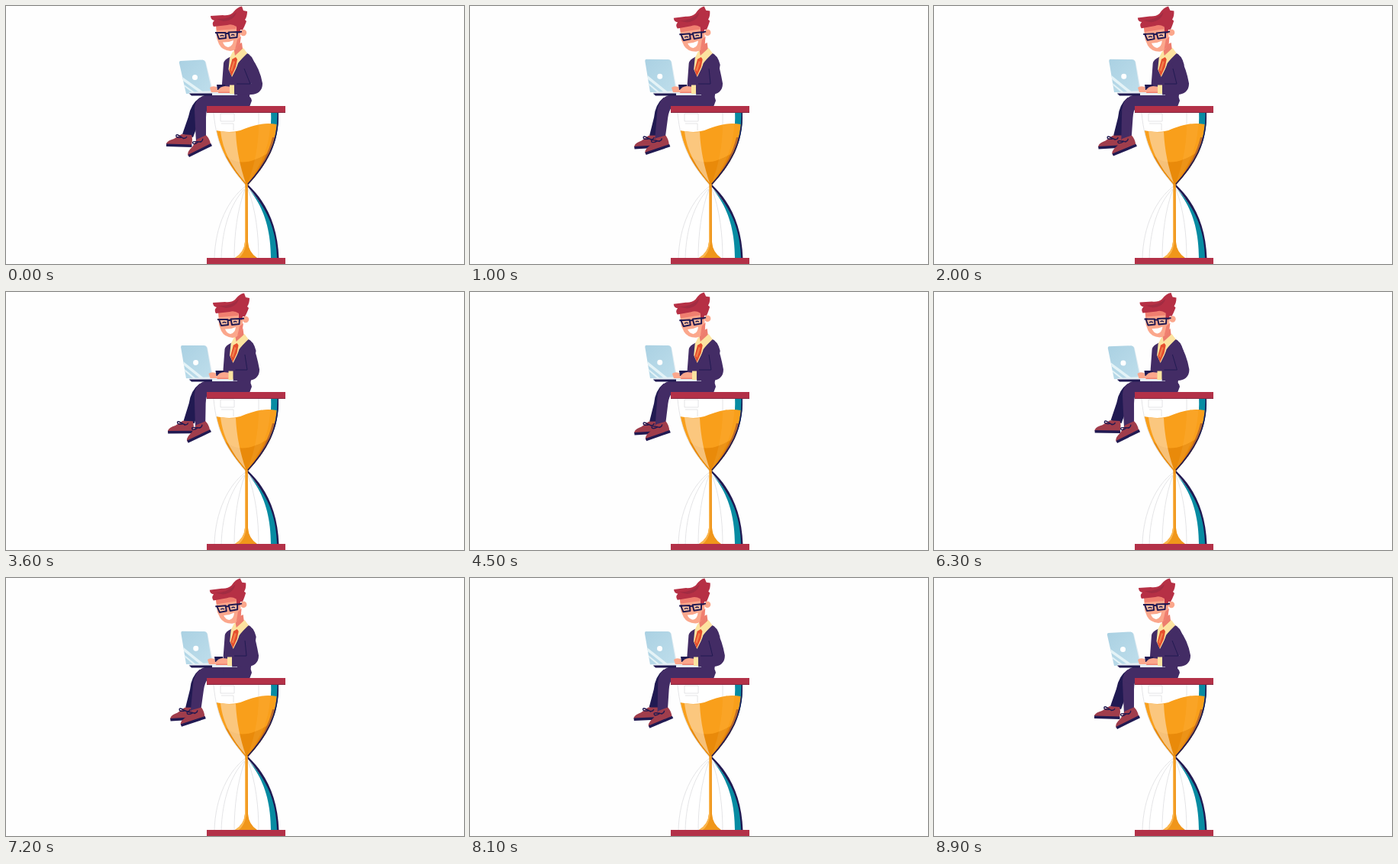
Recreate the animation shown at these times as an HTML page. Size 600x338 px, loop 9000 ms.

```html
<!DOCTYPE html>
<html lang="en">
<head>
<meta charset="utf-8">
<title>Working on the hourglass</title>
<style>
html, body { margin: 0; width: 100%; height: 100%; overflow: hidden; background: #fefefe; }
svg { display: block; width: 100vw; height: 100vh; }
.ink { fill: #211a52; }
.suit { fill: #432c65; }
.bar { fill: #b33148; }
.shoe { fill: #a03d4c; }
.hair { fill: #b63045; }
.skin { fill: #fba78c; }
.cream { fill: #fce3a0; }
.teal { fill: #078ba2; }
.line { fill: none; stroke: #dedde0; stroke-width: .8; }
.lace { fill: none; stroke: #211a52; stroke-width: 1.4; }
</style>
</head>
<body>
<svg viewBox="0 0 600 338">
  <defs>
    <clipPath id="bulb"><path d="M272 140H357C358 180 342 207 315.500 236C290 207 276 184 272 140Z"/></clipPath>
    <clipPath id="lidClip"><path d="M228.500 72L257 70.500Q260 70.500 261 73L270 113L236 115L227 75Q226.500 72 228.500 72Z"/></clipPath>
    <linearGradient id="screen" x2="1" y2="1">
      <stop offset="0" stop-color="#a9d0e2"/><stop offset="1" stop-color="#c0dfec"/>
    </linearGradient>
    <g id="foot">
      <path class="shoe" d="M0 13Q2 9 10 7L20 1L33 2Q35 8 33 15L0 15Z"/>
      <path class="ink" d="M0 13.500L33.500 14.500V18L0 17Z"/>
      <path class="lace" d="M20 5Q12 -1 13 4Q15 6 20 5Q25 8 27 4M19 4L23 7"/>
    </g>
  </defs>

  <!-- hourglass -->
  <g clip-path="url(#bulb)">
    <path fill="#fff" d="M270 138h90v100h-90z"/>
    <path class="teal" d="M347 138H360V238H315Q350 195 347 138Z"/>
    <path fill="#f99f1b" d="M275 163C286 165 296 166 307 163C325 156 338 152 354.500 155C353 184 338 210 315.500 236C293 211 279 187 275 163Z"/>
    <path fill="#e98a0a" d="M281 190C297 207 315 212 349 189L340 215L315.500 238L290 211Z"/>
    <path fill="#fdd9a8" opacity=".7" d="M281 164Q291 166 301 165C302 189 307 211 314 232C296 211 284 190 281 164Z"/>
    <path fill="#fdc169" opacity=".15" d="M331 155.500Q338 153 346 154C346 182 335 207 317 232C326 207 331 182 331 155.500Z"/>
    <path fill="#a75a30" opacity=".75" d="M349 172C345 190 335 210 316 235C340 211 350 192 353.500 172Z"/>
    <path fill="none" stroke="#211a52" stroke-width="3" d="M357 140C358 180 342 207 315.500 236"/>
  </g>
  <path class="line" d="M272 140C276 184 290 207 314 235M281 141h18v10h-18zM282 154h16v9M331 140V155"/>
  <path fill="#fff" d="M315 235C291 252 275 287 273 331H356C354 288 338 257 315 235Z"/>
  <path class="ink" d="M314 234H317C341 257 356 287 357.500 331H354C353 289 337 258 314 234Z"/>
  <path class="teal" d="M318 239.500C340 263 354 289 355 331H347C347 289 336 262 318 239.500Z"/>
  <path class="line" d="M314 236C291 253 274 288 273 331M312 240C294 259 283 292 282 331M313 240C303 267 299 299 299 331M317 240C327 266 331 299 331 331"/>
  <path fill="#f0961a" d="M313.300 233H316.800L317 309Q318 323 329 330H300Q312 323 313 309Z"/>
  <path fill="#fbb64e" d="M313.300 238H314.500V312Q312 325 305 330H300Q312 323 313 309Z"/>
  <path class="bar" d="M263 330h103v8H263z"/>

  <!-- legs -->
  <g id="farLeg">
    <path class="ink" d="M254 120Q242 128 239 145L231 168L245 172L254 148L262 130Z"/>
    <use href="#foot" transform="translate(210 167)"/>
  </g>
  <g id="nearLeg">
    <path class="suit" d="M247 136Q249 121 264 121L266 131Q262 136 262 146V172L249 178Q248 160 247 136Z"/>
    <use href="#foot" transform="translate(232 183) rotate(-28)"/>
  </g>
  <path class="suit" d="M247 135Q247 120 263 116H312Q321 117 322 124L319 132H263L259 140Z"/>
  <path class="bar" d="M263 131h103v9H263z"/>
  <path fill="#842a42" d="M263 139h103v1H263z"/>

  <!-- torso -->
  <g id="torso">
    <path class="suit" d="M285 75Q286 70 293 67L314 61Q323 64 326 77L319 118V125H284L283 102Z"/>
    <path class="cream" d="M293 68L297 60L307 52L316 62L305 75L296 93L291.500 83Z"/>
    <path class="suit" d="M314 62L319 64L314 100H296L304 75Z"/>
    <path fill="#e64e2d" d="M296 66L301 66L303 70L301 80L295.500 92L292.500 84L296 71Z"/>
    <path fill="#f0824b" d="M298 72l2 1-4 13-2-2z"/>
    <path fill="#ed7e6e" d="M298 53L309 48L310 56L300 65Z"/>
    <path class="cream" d="M296 63L301 66L311 55L316 62L306 72L301 67L294 71Z"/>
  </g>

  <!-- head -->
  <g id="head">
    <path class="skin" d="M275 24L307 20V48Q302 59 294 59Q283 58 279 50L276 42Z"/>
    <circle class="skin" cx="311" cy="35" r="4.200"/>
    <path fill="#f07f70" d="M275 24L304 22L301 30L276 32ZM303 44L308 40L306 52L300 57Z"/>
    <path class="hair" d="M268 13L284 12Q292 13 297 9Q303 1 309 .5L311 6L316 7Q316 14 313 18L315 20Q312 28 310 31H307L306 36L302 33V27Q296 23 290 25L272 27Q269 22 273 19Q268 18 268 13Z"/>
    <path fill="#a22c42" d="M275 17Q292 18 302 8Q299 19 285 20Z"/>
    <g fill="#fcc0a2" stroke="#211a52" stroke-width="2" stroke-linejoin="round">
      <path d="M276 35L287.500 35L288 42L279 43Z"/>
      <path d="M291.500 34.500L303 34L302.500 41L293 42Z"/>
      <path fill="none" d="M274 35H278M287 36H292M303 34.500L309 33.500"/>
    </g>
    <path class="lace" d="M280.500 39.500Q283 37.500 285.500 39.500M295 38.500Q297 36.500 299.500 38.500"/>
    <path fill="#fff" d="M284 47.500Q291 48 298 45Q297 53 291 54Q286 53 284 47.500Z"/>
  </g>

  <!-- laptop -->
  <g id="lid">
    <path fill="#e2ecf2" d="M257 70.500Q261 71 262 74L271.500 113H267Z"/>
    <g clip-path="url(#lidClip)">
      <path fill="url(#screen)" d="M225 68h47v50h-47z"/>
      <path fill="#e4f3f7" d="M231 93L266 118H260L232 98ZM232 102L254 118H250L233 105Z"/>
    </g>
    <circle cx="247.500" cy="93.500" r="3.500" fill="#fff"/>
  </g>
  <path fill="#e4edf3" d="M240 113L270 111L303 114.500V117H240Z"/>
  <path class="ink" d="M240 114.500H270V117.500H243Z"/>

  <!-- arms -->
  <g id="hands">
    <path class="skin" d="M267 107Q270 104 276 106L278 113H269Z"/>
    <path class="ink" d="M276 103H287L288 110H277Z"/>
    <path class="skin" d="M277 111Q281 105 287 105L296 106V114H278Z"/>
    <path fill="#ef806d" d="M279 112.500h14v1.500h-15z"/>
  </g>
  <path id="arm" fill="none" stroke="#432c65" stroke-width="14" stroke-linejoin="round"/>
  <path id="fold" fill="none" stroke="#211a52" stroke-width="1"/>
  <path id="cuff" class="cream" d="M293 103.500H299V115H293Z"/>
</svg>
<script>
const CYCLE = 3, times = [0, .6, 1, 1.2, 2, 2.4, 2.9];
const poses = {
  near:  [0, 1, 7.5, 8, 4, 3, 0],
  far:   [0, -2, -5, -5, -5, -.5, 0],
  lean:  [0, .9, 1, 1, 1, 0, 0],
  headX: [0, 3, 1, 1, .8, 0, 0],
  tilt:  [0, 0, -4, -4, -3.5, 0, 0],
  elbow: [0, -4, -5, -5, -2, -3, 0],
  hand:  [0, -1.5, -3, -3, 0, 0, 0]
};
const $ = id => document.getElementById(id);
const n = times.length;

// Periodic smooth curve through the key poses
function sample(values, t) {
  const time = i => times[(i + n) % n] + Math.floor(i / n) * CYCLE;
  const value = i => values[(i + n) % n];
  const slope = i => {
    const a = value(i) - value(i - 1), b = value(i + 1) - value(i);
    return a * b <= 0 ? 0 : (a + b) / (time(i + 1) - time(i - 1));
  };
  let i = n - 1;
  while (times[i] > t) i--;
  const d = time(i + 1) - time(i), u = (t - time(i)) / d, v = 1 - u;
  return v * v * ((1 + 2 * u) * value(i) + u * d * slope(i))
       + u * u * ((1 + 2 * v) * value(i + 1) - v * d * slope(i + 1));
}

function draw(ms) {
  const t = Math.floor(ms % 9000 / 100) / 10 % CYCLE;
  const p = {};
  for (const key in poses) p[key] = sample(poses[key], t);
  const move = (id, value) => $(id).setAttribute("transform", value);
  move("nearLeg", `rotate(${p.near} 258 125)`);
  move("farLeg", `rotate(${p.far} 252 122)`);
  move("torso", `translate(${p.lean * 1.7} 0)`);
  move("head", `translate(${p.headX} ${p.headX / 3}) rotate(${p.tilt} 302 46)`);
  move("lid", `rotate(${p.lean * 3.4} 268 114)`);
  move("hands", `translate(${p.hand} 0)`);
  move("cuff", `translate(${p.hand} 0)`);
  const x = 329 + p.elbow, s = 316 + p.lean;
  $("arm").setAttribute("d", `M${s} 72Q${x - 3} 85 ${x} 102Q${x} 109 ${x - 8} 109L${299 + p.hand} 109.5`);
  $("fold").setAttribute("d", `M${s - 4} 82L${x - 9} 102L${302 + p.hand} 102`);
}

function frame(now) {
  draw(now);
  requestAnimationFrame(frame);
}
draw(0);
requestAnimationFrame(frame);
</script>
</body>
</html>
```
